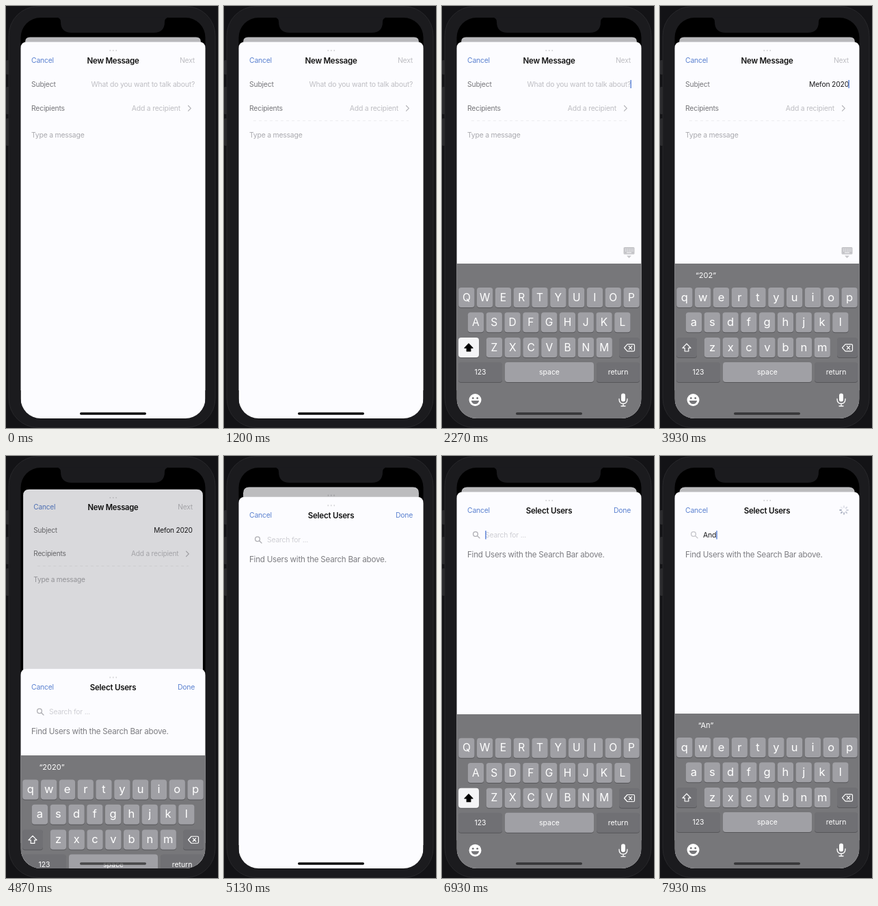
Animation, 310 px wide and 616 px high, one loop 8000 ms. Source, as an HTML page:

```html
<!DOCTYPE html>
<html lang="en">
<head>
<meta charset="utf-8">
<title>New message</title>
<style>
html, body { margin: 0; width: 100%; height: 100%; overflow: hidden; background: #131316; }
svg { display: block; width: 310px; height: 616px; }
text { font: 10.4px Inter, Roboto, sans-serif; letter-spacing: -.02em; fill: #bebec3; }
.title { font-size: 11.5px; font-weight: 600; fill: #111; text-anchor: middle; }
.link { fill: #5c82d0; }
.label { fill: #77777b; }
.body { fill: #a9a9ae; }
.info { font-size: 11.6px; fill: #7c7c80; }
.entry { fill: #1c1c1e; }
.end { text-anchor: end; }
.card { fill: #fcfcff; }
.caret { fill: #4a76d4; }
.keyboard text { fill: #fff; letter-spacing: 0; text-anchor: middle; }
.keyboard .letter { font-size: 15.5px; }
.lower .letter { font-size: 16.5px; }
.key { fill: #a0a0a5; }
.special { fill: #707074; }
.line { fill: none; stroke-linecap: round; stroke-linejoin: round; }

.slide, .sheet, .base, .dim, .strip { animation: 8s cubic-bezier(.36,.66,.04,1) infinite; }
.slide { animation-name: slide; }
.sheet { animation-name: rise; }
.base { animation-name: recede; transform-origin: 156.5px 52.5px; }
.dim { animation-name: dim; fill: #000; }
.strip { animation-name: strip; fill: #b9b9bc; }
.spin { animation: spin 1s steps(8) infinite; transform-origin: 269px 79px; }

@keyframes slide {
  0%, 21.25% { transform: translateY(260px); }
  27.5%, 60.21% { transform: none; }
  66.46%, 81.25% { transform: translateY(260px); }
  87.5%, 100% { transform: none; }
}
@keyframes rise {
  0%, 59.62% { transform: translateY(563px); }
  65.87%, 100% { transform: none; }
}
@keyframes recede {
  0%, 59.62% { transform: translateY(0) scale(1); }
  65.87%, 100% { transform: translateY(-7px) scale(.95); }
}
@keyframes dim {
  0%, 59.62% { opacity: 0; }
  65.87%, 100% { opacity: .26; }
}
@keyframes strip {
  0%, 59.62% { opacity: 1; }
  60.8%, 100% { opacity: 0; }
}
@keyframes spin { to { transform: rotate(360deg); } }
</style>
</head>
<body>
<svg viewBox="0 0 310 616">
  <defs>
    <clipPath id="screen"><rect x="21.5" y="17" width="270" height="585" rx="29"/></clipPath>
    <path id="panel" d="M21.500 616V61.500q0-9 9-9H282.500q9 0 9 9V616z"/>
    <path id="grip" class="line" d="M151.5 65H163" stroke="#d3d3d7" stroke-width="2" stroke-dasharray="1.5 3" style="stroke-linecap:butt"/>
  </defs>

  <g fill="#2a2a2d">
    <rect y="79" width="5" height="21" rx="1.5"/>
    <rect y="118" width="5" height="40" rx="1.5"/>
    <rect y="164" width="5" height="40" rx="1.5"/>
  </g>
  <rect x="4" y=".5" width="302" height="615" rx="43" fill="#1b1b1e" stroke="#28282b"/>

  <g clip-path="url(#screen)">
    <rect width="310" height="616"/>
    <path class="strip" d="M28 70V52.500q0-7 7-7H278q7 0 7 7V70z"/>

    <g class="base">
      <use href="#panel" class="card"/>
      <use href="#grip"/>
      <text class="link" x="37" y="83">Cancel</text>
      <text class="title" x="156.5" y="83.7">New Message</text>
      <text class="end" x="276" y="83">Next</text>
      <text class="label" x="37" y="117.7">Subject</text>
      <text class="end" id="subjectHint" x="276" y="117.7">What do you want to talk about?</text>
      <text class="end entry" id="subject" x="276" y="117.7"></text>
      <rect class="caret" id="subjectCaret" x="275.5" y="108" width="1.3" height="12"/>
      <text class="label" x="37" y="153">Recipients</text>
      <text class="end" x="255" y="153">Add a recipient</text>
      <path class="line" d="M266.5 145.5l3.8 3.8-3.8 3.8" stroke="#b2b2b7" stroke-width="1.2"/>
      <path id="rule" d="M43 167.5H270" stroke="#ededf0" stroke-dasharray="4 4"/>
      <text class="body" x="37" y="191.7">Type a message</text>
      <g class="slide" fill="#c6c6ca">
        <rect x="265.5" y="352" width="16" height="10.5" rx="1.5"/>
        <path d="M268 355H280M268 357.5H280" stroke="#fcfcff" stroke-width="1.2" stroke-dasharray="1.3 1.3"/>
        <path d="M270 360H277" stroke="#fcfcff"/>
        <path d="M270 364.5H277L273.5 368z"/>
      </g>
      <use href="#panel" class="dim"/>
    </g>

    <g class="sheet">
      <use href="#panel" class="card"/>
      <use href="#grip"/>
      <text class="link" x="37" y="83">Cancel</text>
      <text class="title" x="156.5" y="83.7">Select Users</text>
      <text class="link end" id="done" x="276" y="83">Done</text>
      <g id="spinner"><g class="spin" id="spokes"></g></g>
      <g id="lens" class="line" stroke="#aeaeb3" stroke-width="1.3">
        <circle cx="49" cy="114" r="3.4"/>
        <path d="M51.6 116.6L55 119.8"/>
      </g>
      <text id="searchHint" x="63" y="118.5" style="fill:#cfcfd4">Search for ...</text>
      <text class="entry" id="search" x="63" y="118.5"></text>
      <rect class="caret" id="searchCaret" y="109" width="1.3" height="12.5"/>
      <text class="info" x="37" y="147.5">Find Users with the Search Bar above.</text>
    </g>

    <g class="slide">
      <g class="keyboard" id="keyboard">
        <rect x="21" y="376" width="271" height="240" fill="#77777a"/>
        <text id="suggestion" x="67" y="397" style="font-size:11px"></text>
        <g id="keys"></g>
        <path id="shiftArrow" class="line" d="M39 493l6 6.2h-3.2v4.8h-5.6v-4.8h-3.2z" stroke-width="1.2"/>
        <path class="line" d="M271 493.8h9q1.5 0 1.5 1.5v7q0 1.5-1.5 1.5h-9l-4.5-5zM273.3 496.5l4.4 4.6m0-4.6l-4.4 4.6" stroke="#fff" stroke-width="1.2"/>
        <circle cx="48.5" cy="575" r="9" fill="#fff"/>
        <g fill="#77777a">
          <circle cx="45.3" cy="572.5" r="1.4"/>
          <circle cx="51.7" cy="572.5" r="1.4"/>
          <path d="M42.8 576h11.4q-1 5-5.7 5t-5.7-5z"/>
        </g>
        <rect x="262" y="565.5" width="6" height="12" rx="3" fill="#fff"/>
        <path class="line" d="M259 573.5q0 7 6 7t6-7M265 580.5v3.5m-3 0h6" stroke="#fff" stroke-width="1.3"/>
      </g>
    </g>
    <rect id="home" x="108" y="593.3" width="97" height="3.4" rx="1.7" fill="#0c0c0d"/>
  </g>
  <path d="M74 16.5q6 1 6 6.5q0 16 16 16H216q16 0 16-16q0-5.500 6-6.500z" fill="#1b1b1e"/>
</svg>

<script>
const $ = id => document.getElementById(id);
const LOOP = 8000, LAG = 70;
const subject = { text: 'Mefon 2020', start: 2450, step: 160, focus: 1700, blur: 4770 };
const search = { text: 'And', start: 7460, step: 215, focus: 6500, blur: LOOP };

function add(parent, tag, attrs, text = '') {
  const node = document.createElementNS('http://www.w3.org/2000/svg', tag);
  for (const name in attrs) node.setAttribute(name, attrs[name]);
  node.textContent = text;
  return parent.appendChild(node);
}

function addKey(x, y, width, label, special) {
  const keys = $('keys');
  add(keys, 'rect', { x, y: y + 1, width, height: 29, rx: 4, fill: '#57575a' });
  const cap = add(keys, 'rect', { x, y, width, height: 29, rx: 4, class: special ? 'special' : 'key' });
  const letter = label.length === 1;
  add(keys, 'text', { x: x + width / 2, y: y + (letter ? 19.7 : 18.2), class: letter ? 'letter' : 'word' }, label);
  return cap;
}

[['QWERTYUIOP', 24.2, 411], ['ASDFGHJKL', 37.8, 447.3], ['ZXCVBNM', 64.8, 484]].forEach(([row, x, y]) =>
  [...row].forEach((label, i) => addKey(x + i * 26.8, y, 23.3, label)));
const shiftKey = addKey(24, 484, 30, '', true);
addKey(259, 484, 30, '', true);
addKey(24, 520, 64, '123', true);
addKey(92, 520, 130, 'space');
addKey(226, 520, 63, 'return', true);
const letters = [...document.querySelectorAll('.letter')];

for (let i = 0; i < 8; i++) {
  add($('spokes'), 'path', {
    d: 'M269 75.2V73', class: 'line', stroke: '#6d7893', 'stroke-width': 1.4,
    opacity: .2 + i * .1, transform: `rotate(${i * 45} 269 79)`
  });
}

const typed = (field, t) =>
  field.text.slice(0, Math.max(0, Math.floor((t - field.start) / field.step) + 1));
const show = (id, on) => { $(id).style.display = on ? '' : 'none'; };
const focused = (field, t) => t >= field.focus && t < field.blur;

let wasUpper;
function setCase(upper) {
  if (upper === wasUpper) return;
  wasUpper = upper;
  for (const node of letters) {
    node.textContent = upper ? node.textContent.toUpperCase() : node.textContent.toLowerCase();
  }
  $('keyboard').classList.toggle('lower', !upper);
  shiftKey.style.fill = upper ? '#f4f4f6' : '';
  $('shiftArrow').style.fill = upper ? '#000' : 'none';
  $('shiftArrow').style.stroke = upper ? '#000' : '#fff';
}

function draw(now) {
  const t = now % LOOP;
  const title = typed(subject, t), query = typed(search, t);
  $('subject').textContent = title;
  $('search').textContent = query;
  show('subjectHint', !title);
  show('searchHint', !query);
  show('subjectCaret', focused(subject, t));
  show('searchCaret', focused(search, t));
  $('searchCaret').setAttribute('x', 63.3 + (query ? $('search').getComputedTextLength() : 0));
  show('rule', t >= 70);
  show('done', !query);
  show('spinner', query);
  $('lens').style.opacity = query ? .7 : 1;

  const field = t < 6000 ? subject : search;
  setCase(!typed(field, t));
  const word = typed(field, t - LAG).split(' ').pop();
  $('suggestion').textContent = word ? `“${word}”` : '';
  const covered = (t > 1800 && t < 5000) || t > 6600;
  $('home').style.opacity = covered ? .6 : 1;
  requestAnimationFrame(draw);
}
draw(performance.now());
</script>
</body>
</html>
```
